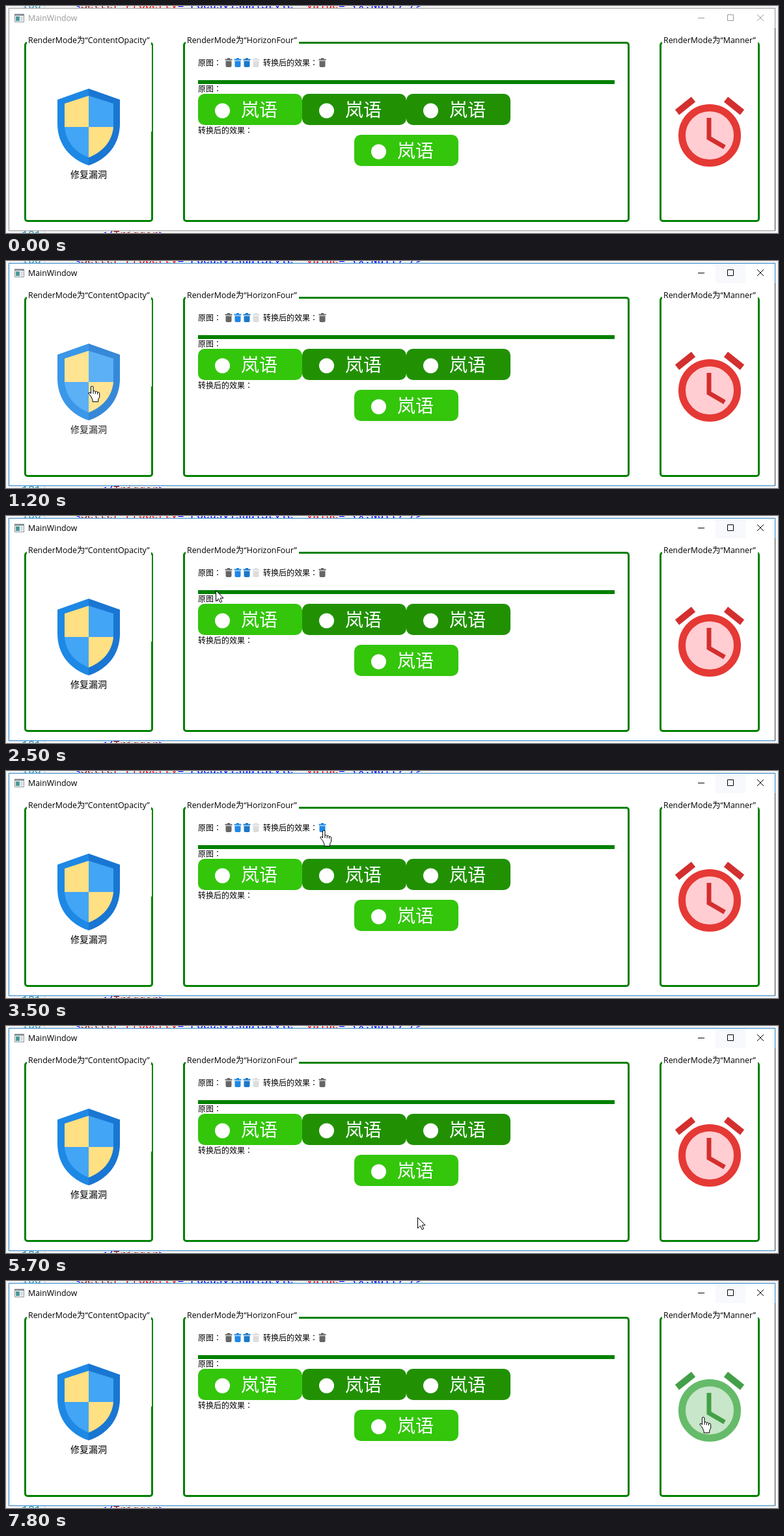
An HTML page for the animation above (8 s loop, 1186 px wide and 349 px high).

```html
<!DOCTYPE html>
<html lang="zh-CN">
<head>
<meta charset="utf-8">
<title>MainWindow</title>
<style>
html, body { margin: 0; width: 100%; height: 100%; overflow: hidden; background: #f4f4f4; }
svg { display: block; }
text { font: 12.4px "Open Sans", "Noto Sans", "Noto Sans CJK SC", "Noto Sans CJK", sans-serif; white-space: pre; }
.zh { font: 14px "Noto Sans CJK SC", "Noto Sans CJK", sans-serif; }
.notes text { font: 12px "Noto Sans CJK TC", "Noto Sans CJK", sans-serif; }
.code { font: 16.5px "Liberation Mono", monospace; fill: #00f; }
.num { fill: #2b91af; }
.tag { fill: #a31515; }
.attr { fill: #f00; }
</style>
</head>
<body>
<svg width="1186" height="349" viewBox="0 0 1186 349">
  <defs>
    <path id="bin" d="M4 0h4v1.5h3.5v2h-11v-2H4zM1.5 4.5h9V12q0 2-2 2h-5q-2 0-2-2z"/>
    <g id="badge">
      <rect width="160" height="48" rx="10"/>
      <circle cx="37.5" cy="26" r="11.5" fill="#fff"/>
      <text x="66" y="35" class="zh" style="font-size:28px" fill="#fff">岚语</text>
    </g>
  </defs>

  <!-- editor behind the window -->
  <text class="code num" x="24" y="4">166</text>
  <text class="code" x="105" y="4">&lt;<tspan class="tag">Setter</tspan> <tspan class="attr">Property</tspan>="FocusVisualStyle" <tspan class="attr">Value</tspan>="{x:Null}"/&gt;</text>
  <text class="code num" x="24" y="357">181</text>
  <text class="code" x="145" y="357">&lt;/<tspan class="tag">Trigger</tspan>&gt;</text>
  <path d="M59.5 0v349" stroke="#ccc"/>

  <!-- window frame -->
  <rect id="frame" x="4.5" y="3.5" width="1177" height="342" fill="#fff"/>
  <path d="M1181.5 34V345" stroke="#444"/>
  <rect id="maxHover" x="1090" y="4" width="46" height="30" fill="#f7f9fc"/>
  <path d="M13.5 12.5h14v12h-14z" fill="#fff" stroke="#8a9299"/>
  <path d="M13 12h15v3H13z" fill="#8a9299"/>
  <path d="M15 16h6v7h-6z" fill="#4a9a98"/>
  <path d="M22 16h4v7h-4z" fill="#d5dade"/>
  <text id="title" x="34" y="23">MainWindow</text>
  <path id="controls" d="M1063 18.5h10M1108.5 13.5h9v9h-9zM1154 13l10 10m0-10l-10 10" fill="none"/>
  <g id="groups"></g>
  <path d="M223 60h1V193h-1z" fill="#fff"/>

  <!-- shield -->
  <g id="shield">
    <path d="M127 127L79 144V181C79 213 99 236 127 245z" fill="#1e88e5"/>
    <path d="M127 127L175 144V181C175 213 155 236 127 245z" fill="#1976d2"/>
    <path d="M127 138L90 150V186H127z" fill="#ffe082"/>
    <path d="M127 138L165 150V186H127z" fill="#42a5f5"/>
    <path d="M90 186H127V233C105 224 92 208 90 186z" fill="#42a5f5"/>
    <path d="M165 186H127V233C149 224 163 208 165 186z" fill="#ffe082"/>
    <text class="zh" x="99" y="264">修复漏洞</text>
  </g>

  <!-- sprite samples; the Traditional face centres the colon -->
  <g class="notes" lang="zh-TW">
    <text x="295" y="92">原图：</text>
    <text x="395" y="92">转换后的效果：</text>
    <text x="295" y="132">原图：</text>
    <text x="295" y="196">转换后的效果：</text>
  </g>
  <g id="samples"></g>
  <use id="trash" href="#bin" x="480" y="80"/>
  <path d="M295 114h640v6H295z" fill="#008000"/>
  <use id="button" href="#badge" x="535" y="198"/>

  <!-- alarm clock -->
  <circle id="face" cx="1081" cy="199" r="42.5" stroke-width="11"/>
  <path id="hands" d="M1080 172V203L1104 217" fill="none" stroke-width="7"/>
  <path id="bells" d="M1031 163.500L1056 143.500M1131 163.500L1106 143.500" stroke-width="10"/>

  <!-- pointers, with the hot spot at 0,0 -->
  <path id="arrow" d="M.5 .5V17l4-3.800 2.700 5.800 2.500-1.200L7.200 12.200H12z" fill="#fff" stroke="#000"/>
  <g id="hand" fill="#fff" stroke="#000">
    <path d="M-1.500 16L-4.500 12.500q-1.500-2 .5-2.500 1.500 0 2.500 2V2q0-1.700 1.700-1.700T2 2V8q2.500-1.300 3.300.8 2.500-1 3.200 1 3-.8 3.200 2v5.200l-2 4V24.300H1V21.500z"/>
    <path d="M2 8v4M5.300 9v3.500M8.500 10v3" fill="none"/>
  </g>
</svg>
<script>
const GREEN = "#33c60b", DARK_GREEN = "#219103";
const BINS = ["#666", "#1e88e5", "#1c78c8", "#ddd"];
const $ = id => document.getElementById(id);
const set = (id, attrs) => { for (const k in attrs) $(id).setAttribute(k, attrs[k]); };

$("groups").innerHTML = [
  [28, 198, 191, "ContentOpacity"],
  [272, 686, 174, "HorizonFour"],
  [1004, 154, 147, "Manner"]
].map(([x, w, gap, name]) => `
  <rect x="${x + 1.5}" y="56.500" width="${w - 3}" height="274" rx="3.500" fill="none" stroke="#008000" stroke-width="3"/>
  <rect x="${x + 4}" y="46" width="${gap}" height="14" fill="#fff"/>
  <text x="${x + 6}" y="57">RenderMode为“${name}”</text>`).join("");

const strip = (sprite, x, y, step, fills) => fills.map((fill, i) =>
  `<use href="#${sprite}" x="${x + i * step}" y="${y}" fill="${fill}"/>`).join("");
$("samples").innerHTML = strip("bin", 336, 80, 14, BINS)
  + strip("badge", 295, 135, 160, [GREEN, DARK_GREEN, DARK_GREEN]);

// pointer moves: start and end time, destination, optional bend of the curve
const origin = [1113, 18];
const moves = [
  { from: 300, to: 900, end: [221, 24] },
  { from: 900, to: 1200, end: [132, 192] },
  { from: 2100, to: 3000, end: [488, 91], bend: [375, 74] },
  { from: 4400, to: 5100, end: [585, 224], bend: [517, 235] },
  { from: 5600, to: 5700, end: [632, 294] },
  { from: 5700, to: 6000, end: [672, 265] },
  { from: 6400, to: 7000, end: [678, 230] },
  { from: 7300, to: 7800, end: [1071, 209] }
];
const clicks = [3300, 3500, 3800, 4000, 4100]; // down, up, down, ...

const ramp = (t, from, to) => Math.min(1, Math.max(0, (t - from) / (to - from)));
const mix = (a, b, p) => a.map((v, i) => v + (b[i] - v) * p);

function pointer(t) {
  let pos = origin;
  for (const { from, to, end, bend } of moves) {
    const p = ramp(t, from, to);
    pos = bend ? mix(mix(pos, bend, p), mix(bend, end, p), p) : mix(pos, end, p);
  }
  return pos.map(Math.round);
}

function draw(now) {
  const t = Math.floor(now % 8000 / 100) * 100;
  const active = t >= 300;
  const [x, y] = pointer(t);
  const over = (l, top, r, b) => active && x >= l && x < r && y >= top && y < b;
  const shield = over(79, 127, 175, 265);
  const trash = over(480, 80, 492, 94);
  const button = over(535, 198, 695, 246);
  const clock = over(1033, 140, 1129, 248);
  const hand = shield || trash || button || clock;
  const pressed = clicks.filter(c => t >= c).length % 2;
  const ink = active ? "#000" : "#999";
  const red = clock ? "#43a047" : "#d32f2f";

  set("frame", { stroke: active ? "#2b84c6" : "#999" });
  set("maxHover", { opacity: +active });
  set("title", { fill: ink });
  set("controls", { stroke: ink });
  set("shield", { opacity: 1 - .4 * (ramp(t, 1000, 1600) - ramp(t, 2100, 2400)) });
  set("trash", { fill: BINS[trash ? 1 + pressed : 0] });
  set("button", { fill: button ? DARK_GREEN : GREEN });
  set("face", { fill: clock ? "#c8e6c9" : "#ffcdd2", stroke: clock ? "#66bb6a" : "#e53935" });
  set("hands", { stroke: red });
  set("bells", { stroke: red });

  const transform = `translate(${x} ${y})`;
  set("arrow", { transform, opacity: +(active && !hand) });
  set("hand", { transform, opacity: +hand });
}

const start = performance.now();
function tick() {
  draw(performance.now() - start);
  requestAnimationFrame(tick);
}
tick();
</script>
</body>
</html>
```
